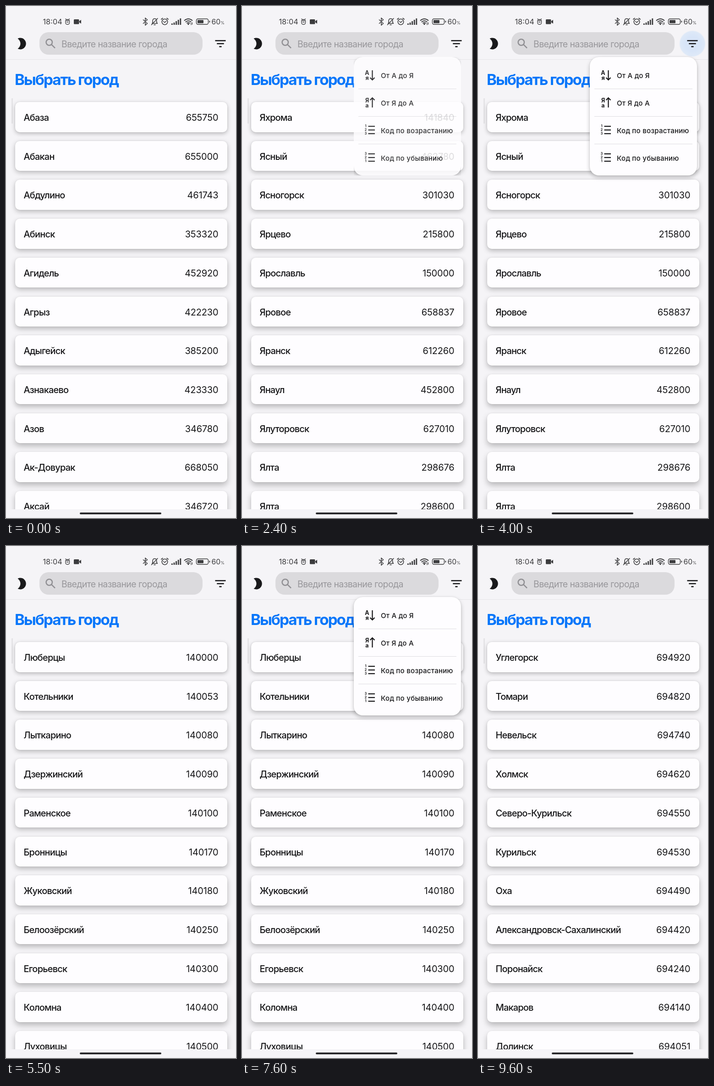
Write an HTML page that moves like this. It is 502x1115 px and loops after 9.7 s.

```html
<!DOCTYPE html>
<html lang="ru">
<head>
<meta charset="utf-8">
<title>Выбрать город</title>
<style>
  html, body { margin: 0; width: 100%; height: 100%; overflow: hidden; background: #f5f4f7; }
  body { position: relative; font-family: Inter, Roboto, "Noto Sans", sans-serif; font-optical-sizing: none; color: #151517; }
  .abs, .list, .card, .ripple, .menu, .menu span, .menu hr, .menu svg { position: absolute; }
  .abs, .card, .menu span { white-space: nowrap; }
  #top { left: 0; top: 0; }
  .search { left: 73px; top: 57px; width: 356px; height: 49px; border-radius: 20px; background: #dbdadd; }
  .hint { left: 121px; top: 70px; font-size: 19.5px; line-height: 27px; letter-spacing: -.6px; color: #98979b; }
  .rule { left: 0; top: 116px; width: 502px; height: 1px; background: #e5e4e7; }
  h1 { margin: 0; left: 19px; top: 140px; font-size: 33.2px; line-height: 40px; font-weight: 700; letter-spacing: -2px; color: #0676fa; }
  .thumb { left: 12px; top: 201px; width: 3px; height: 55px; background: #e5e4e7; }
  .lists { left: 0; top: 117px; width: 502px; height: 979px; overflow: hidden; }
  .list { inset: 0; opacity: 0; }
  .card { left: 19.5px; width: 423px; height: 65.5px; padding: 0 20px; border-radius: 10px; background: #fefdff;
    display: flex; justify-content: space-between; font-size: 20px; line-height: 69px; }
  .card b { font-weight: 450; letter-spacing: -.82px; margin-left: -1px; }
  .card i { font-style: normal; letter-spacing: -.15px; margin-right: -1px; }
  .home { left: 161px; top: 1102.5px; width: 178px; height: 4px; border-radius: 2px; background: #2a2a2c; }
  .ripple { left: 439px; top: 53px; width: 58px; height: 58px; border-radius: 50%; opacity: 0;
    background: radial-gradient(closest-side, #d8e5f8 0 55%, #dee9f8 92%, #dee9f800); }
  .menu { left: 244px; top: 111px; width: 234px; height: 258px; border-radius: 20px; background: #fefdff;
    box-shadow: 0 4px 10px rgba(0,0,0,.24), 0 0 3px rgba(0,0,0,.1); transform-origin: 100% 0; opacity: 0; }
  .menu span { left: 59px; font-size: 15.1px; font-weight: 500; line-height: 20px; letter-spacing: .24px; }
  .menu hr { left: 10px; width: 214px; height: 1.5px; margin: 0; border: 0; background: #dddce0; }
  .menu svg { left: 0; top: 0; }
</style>
</head>
<body>
<div class="abs search"></div>
<div class="abs hint">Введите название города</div>
<div class="abs rule"></div>
<h1 class="abs">Выбрать город</h1>
<div class="abs thumb"></div>
<div class="abs lists" id="lists"></div>
<div class="abs home"></div>
<div class="ripple" id="ripple"></div>

<svg class="abs" id="top" width="502" height="116" fill="none" stroke="#3c3c3e" stroke-width="1.6" stroke-linecap="round" stroke-linejoin="round">
  <g fill="#3c3c3e" stroke="none" font-size="16.3">
    <text x="80.5" y="40">18:04</text>
    <text x="448.5" y="40" font-size="15.8">60</text>
    <text x="468.5" y="40" font-size="8.5">%</text>
    <rect x="148" y="29" width="11.5" height="10.5" rx="1.5"/>
    <path d="M160 33l4-3v8.500l-4-3z"/>
    <path d="M361 41v-3h2.800v3zM365.600 41v-5h2.800v5zM370.200 41v-8h2.800v8zM374.800 41v-11h2.800v11zM379.400 41v-14h2.800v14z"/>
    <rect x="418" y="30.500" width="13" height="7" rx="1"/>
    <rect x="443.500" y="32" width="1.800" height="4" rx=".8"/>
    <circle cx="398" cy="39.500" r="1.800"/>
  </g>
  <g stroke-width="1.300">
    <path d="M130 28l1.500 1.500h5.500l1.500-1.500M130 31.500h8.500v5q0 3.500-4.250 3.500t-4.250-3.500zM132.500 35h3.500"/>
  </g>
  <path d="M299.500 30l9 8-4.500 4V26l4.500 4-9 8"/>
  <path d="M319 38h11.500l-1.800-2.500v-4q-.5-4-4.200-4t-4.300 4v4zM323 41h3M317.500 41l13.500-14"/>
  <circle cx="346.500" cy="34.500" r="6.200"/>
  <path d="M343.500 33.500l3 2.500 3-3M338.800 29l3.200-2.500M354.200 29l-3.200-2.500"/>
  <path d="M389.500 31.500q8.500-7 17 0M392.300 34.600q5.700-4.600 11.400 0M395 37.300q3-2.200 6 0" stroke-width="1.900"/>
  <path d="M404 37v4M406.500 36v4" stroke-width="1.200"/>
  <rect x="415.500" y="28" width="26" height="12" rx="3.500" stroke-width="1.400"/>
  <path d="M25.500 71C30 68.800 36 69 39.800 73C45 78 45 86 39.800 91C36 95 30 95.200 25.500 93C33.500 87.500 33.500 76.500 25.500 71Z" fill="#19191b" stroke="none"/>
  <g stroke="#929195" stroke-width="2.600" stroke-linecap="butt">
    <circle cx="94.300" cy="79" r="6.700"/><path d="M99 83.700l8 8"/>
  </g>
  <path d="M456.500 75.500h23M460.300 82h15.400M465.400 88.500h5.200" stroke="#151517" stroke-width="2.500" stroke-linecap="butt"/>
</svg>

<div class="menu" id="menu"></div>

<script>
const LOOP = 9700;
const PITCH = 84.7;
const swaps = [0, 2300, 4780, 7720, LOOP];
const opens = [1080, 3690, 6235];
const closes = [2350, 4790, 7730];

const cities = [
  `Абаза 655750,Абакан 655000,Абдулино 461743,Абинск 353320,Агидель 452920,Агрыз 422230,
   Адыгейск 385200,Азнакаево 423330,Азов 346780,Ак-Довурак 668050,Аксай 346720`,
  `Яхрома 141840,Ясный 462780,Ясногорск 301030,Ярцево 215800,Ярославль 150000,Яровое 658837,
   Яранск 612260,Янаул 452800,Ялуторовск 627010,Ялта 298676,Ялта 298600`,
  `Люберцы 140000,Котельники 140053,Лыткарино 140080,Дзержинский 140090,Раменское 140100,Бронницы 140170,
   Жуковский 140180,Белоозёрский 140250,Егорьевск 140300,Коломна 140400,Луховицы 140500`,
  `Углегорск 694920,Томари 694820,Невельск 694740,Холмск 694620,Северо-Курильск 694550,Курильск 694530,
   Оха 694490,Александровск-Сахалинский 694420,Поронайск 694240,Макаров 694140,Долинск 694051`
];

const $ = id => document.getElementById(id);

// Steps are [time in ms, properties, easing towards the next step].
function loop(el, steps) {
  const frames = steps.map(([t, props, easing = 'linear']) => ({ offset: t / LOOP, easing, ...props }));
  el.animate(frames, { duration: LOOP, iterations: Infinity });
}

// Shadows fall further the lower a card sits on the screen.
function card(entry, i) {
  const [name, code] = entry.trim().split(' ');
  const drop = 3 + i * 0.4;
  const style = `top:${92 + i * PITCH}px;box-shadow:0 ${drop}px ${10 + i * 0.3}px rgba(0,0,0,.25),0 0 3px rgba(0,0,0,.09)`;
  return `<div class="card" style="${style}"><b>${name}</b><i>${code}</i></div>`;
}

cities.forEach((text, n) => {
  const el = document.createElement('div');
  el.className = 'list';
  el.innerHTML = text.split(',').map(card).join('');
  $('lists').append(el);
  const steps = swaps.map((t, k) => [t, { opacity: k === n ? 1 : 0 }, 'step-end']);
  loop(el, steps);
});

const label = (x, y, s, size) => `<text x="${x}" y="${y}" font-size="${size}" text-anchor="middle">${s}</text>`;

function letters(y, top, bottom, arrow) {
  return label(29, y - 1.5, top, 12.5) + label(29, y + 10, bottom, 12.5) +
    `<path d="M40.500 ${y - 11}v21${arrow}"/>`;
}

function digits(y, order) {
  return [...order].map((d, k) => {
    const row = y + (k - 1) * 8;
    return label(26, row + 2, d, 7) + `<path d="M31.500 ${row}h14.500"/>`;
  }).join('');
}

const items = ['От А до Я', 'От Я до А', 'Код по возрастанию', 'Код по убыванию'];
const icons = letters(40, 'А', 'я', 'm-5-5l5 5 5-5') + letters(100, 'Я', 'а', 'm-5-16l5-5 5 5') +
  digits(159, '123') + digits(219, '321');
$('menu').innerHTML =
  items.map((s, i) => `<span style="top:${30.5 + i * 60}px">${s}</span>` +
    (i ? `<hr style="top:${8.5 + i * 60}px">` : '')).join('') +
  `<svg width="60" height="258" fill="none" stroke="#151517" stroke-width="2.2">
    <g>${icons.replace(/<text/g, '<text fill="#151517" stroke="none" font-weight="700"')}</g></svg>`;

const ease = 'cubic-bezier(.4,0,.2,1)';
const hidden = { opacity: 0, transform: 'scale(0)' };
const shown = { opacity: 1, transform: 'scale(1)' };
const faded = { opacity: 0, transform: 'scale(1)' };
const cut = { clipPath: 'inset(0)' };
const free = { clipPath: 'inset(-20px)' };
const small = { opacity: 0, transform: 'scale(.1)' };

const menuSteps = [[0, hidden]];
const clipSteps = [[0, cut, 'step-end']];
const rippleSteps = [[0, small]];
opens.forEach((t, i) => {
  const end = closes[i];
  menuSteps.push([t, hidden, ease], [t + 250, shown], [end, shown, ease], [end + 250, faded], [end + 251, hidden]);
  clipSteps.push([t, free, 'step-end'], [end, cut, 'step-end']);
  const press = t - 30;
  rippleSteps.push([press, small], [press + 75, { opacity: 1, transform: 'scale(.45)' }],
    [press + 230, shown], [press + 450, shown], [press + 825, faded], [press + 826, small]);
});
menuSteps.push([LOOP, hidden]);
clipSteps.push([LOOP, cut]);
rippleSteps.push([LOOP, small]);

loop($('menu'), menuSteps);
loop($('menu'), clipSteps);
loop($('ripple'), rippleSteps);
</script>
</body>
</html>
```
